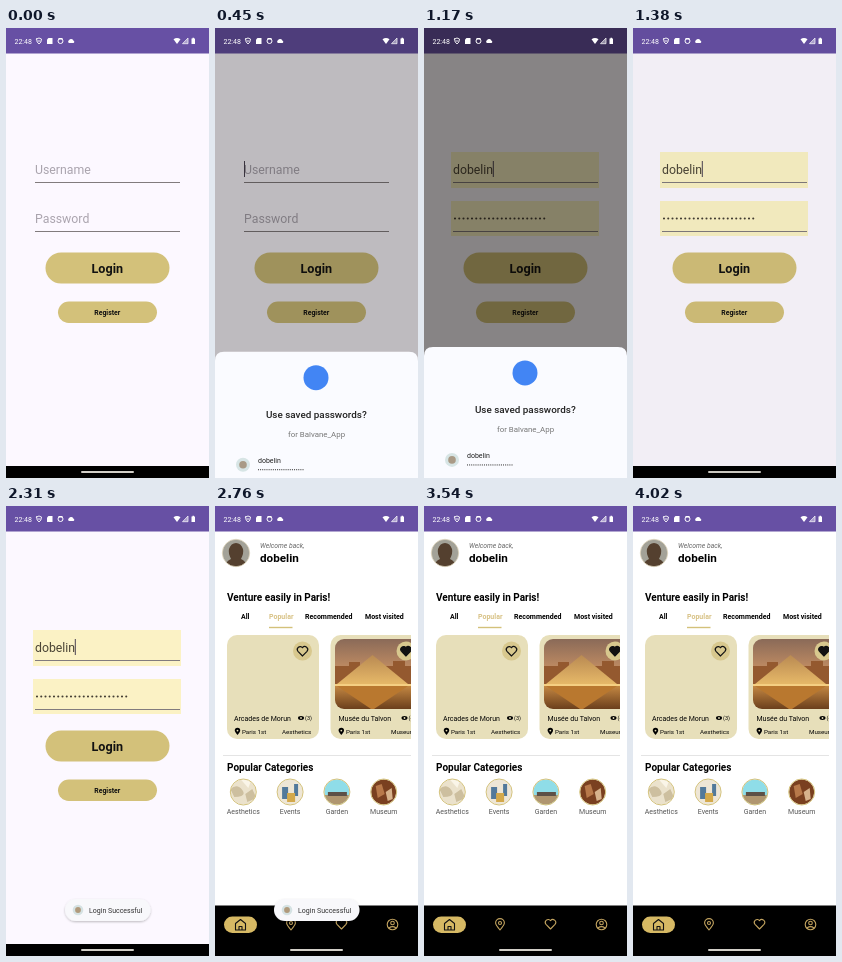
Write an HTML page that moves like this. It is 203 px wide and 450 px high and loops after 4050 ms.

```html
<!DOCTYPE html>
<html lang="en">
<head>
<meta charset="utf-8">
<title>Login flow</title>
<style>
html, body { margin: 0; width: 100%; height: 100%; overflow: hidden; background: #fcf8ff; }
svg { display: block; width: 100%; height: 100%; font: 7px Roboto, Arial, sans-serif; }
.b { font-weight: 700; }
.m { font-weight: 500; }
.c { text-anchor: middle; }
.field { font-size: 12.3px; }
.line { fill: none; stroke-linecap: round; stroke-linejoin: round; }
</style>
</head>
<body>
<svg viewBox="0 0 203 450">
<defs>
  <path id="heart" d="M0 5L-4.5.3A2.9 2.9 0 0 1 0-3.4A2.9 2.9 0 0 1 4.5.3Z"/>
  <path id="pin" d="M0 5.5C-3 2-4.4.3-4.4-1.5A4.4 4.4 0 0 1 4.4-1.5C4.4.3 3 2 0 5.5Z"/>
  <g id="eye"><ellipse rx="3" ry="1.9"/><circle r=".9" fill="#e7dfba"/></g>
  <g id="place"><use href="#pin" transform="scale(.62)"/><circle cy="-.9" r=".9" fill="#e7dfba"/></g>
  <linearGradient id="dusk" x2="0" y2="1">
    <stop offset="0" stop-color="#8a6a58"/><stop offset=".4" stop-color="#bd8a62"/>
    <stop offset=".65" stop-color="#c98c45"/><stop offset="1" stop-color="#6b3f1c"/>
  </linearGradient>
  <linearGradient id="glow" x2="0" y2="1">
    <stop offset="0" stop-color="#b98a52"/><stop offset="1" stop-color="#e6b868"/>
  </linearGradient>
  <clipPath id="scroller"><path d="M0 120H196V245H0Z"/></clipPath>
  <clipPath id="photo"><rect x="120" y="133" width="84" height="70" rx="9"/></clipPath>
  <clipPath id="disc"><circle r="12.5"/></clipPath>
  <clipPath id="face"><circle cx="21" cy="47" r="13.5"/></clipPath>
  <filter id="shadow" x="-20%" y="-40%" width="140%" height="190%">
    <feDropShadow dx="0" dy="1" stdDeviation="1.3" flood-opacity=".25"/>
  </filter>
</defs>

<g id="login">
  <path fill="#fcf8ff" d="M0 0H203V450H0Z"/>
  <g id="empty" class="field" fill="#aaa4ae">
    <text x="29" y="146">Username</text><text x="29" y="195">Password</text>
  </g>
  <g id="filled" class="field">
    <path fill="#fbf2c5" d="M27 124H175V160H27ZM27 173H175V208H27Z"/>
    <text x="29" y="146" fill="#4b4536">dobelin</text>
    <path class="line" d="M31 190.5H121" stroke="#443e33" stroke-width="2.1" stroke-dasharray="0 4.25"/>
  </g>
  <path d="M29 154.5H174M29 203.5H174" stroke="#817b7d" stroke-width="1"/>
  <path id="caret" stroke="#4a4252" stroke-width="1"/>
  <rect x="39.5" y="224.5" width="124" height="31" rx="15.5" fill="#d3c17a"/>
  <rect x="52" y="273.5" width="99" height="21.5" rx="10.75" fill="#d3c17a"/>
  <text class="b c" x="101.3" y="245" font-size="12.6" fill="#111">Login</text>
  <text class="b c" x="101.3" y="287" font-size="6.9" fill="#111">Register</text>
</g>

<g id="dash">
  <path fill="#fff" d="M0 0H203V450H0Z"/>
  <g clip-path="url(#face)">
    <circle cx="21" cy="47" r="14" fill="#a3a298"/>
    <path fill="#54402f" d="M10 61Q11 55 16 53Q13 47 14 43Q16 37 21 37T28 43Q29 47 26 53Q31 55 32 61Z"/>
  </g>
  <circle cx="21" cy="47" r="13.7" fill="none" stroke="#d8cfb5" stroke-width=".8"/>
  <text x="45" y="42" font-size="6.8" font-style="italic" fill="#666">Welcome back,</text>
  <text class="b" x="45" y="56" font-size="11.7">dobelin</text>
  <g class="b" font-size="10"><text x="12" y="95">Venture easily in Paris!</text><text x="12" y="265">Popular Categories</text></g>
  <g class="b">
    <text x="26" y="113">All</text><text x="54" y="113" fill="#d8c286">Popular</text>
    <text x="90" y="113">Recommended</text><text x="150" y="113">Most visited</text>
  </g>
  <path d="M54 121.5H77.5" stroke="#d3c17a" stroke-width="1.4"/>
  <g clip-path="url(#scroller)">
    <g fill="#e7dfba"><rect x="12" y="129" width="92" height="104" rx="10"/><rect x="115.5" y="129" width="92" height="104" rx="10"/></g>
    <g clip-path="url(#photo)">
      <path fill="url(#dusk)" d="M120 133H204V203H120Z"/>
      <path fill="#94592f" d="M120 160H134V156H145V160H178V155H190V160H204V178H120Z"/>
      <path fill="url(#glow)" d="M122 178L157.5 149L193 178Z"/>
      <path fill="#b9782f" d="M122 180H193L157.5 204Z"/>
      <path fill="#f5cf82" d="M120 178H204V180H120Z"/>
    </g>
    <g fill="#d8c88e"><circle cx="87.5" cy="145" r="9.5"/><circle cx="191" cy="145" r="9.5"/></g>
    <use href="#heart" x="87.5" y="145" fill="none" stroke="#111" stroke-width="1.2"/>
    <use href="#heart" x="191" y="145" fill="#111" stroke="#111" stroke-width="1.2"/>
    <text x="19" y="215">Arcades de Morun</text><text x="123.5" y="215">Musée du Talvon</text>
    <use href="#eye" x="86" y="212"/><use href="#eye" x="189.5" y="212"/>
    <use href="#place" x="22.5" y="225.5"/><use href="#place" x="126.3" y="225.5"/>
    <g font-size="6.2">
      <text x="90" y="214" font-size="5.5">(3)</text><text x="193.5" y="214" font-size="5.5">(4)</text>
      <text x="27" y="228">Paris 1st</text><text x="67" y="228">Aesthetics</text>
      <text x="131" y="228">Paris 1st</text><text x="176" y="228">Museum</text>
    </g>
  </g>
  <path d="M8 249.5H196" stroke="#dedede" stroke-width=".8"/>
  <g id="categories"></g>
  <path d="M0 399.4H203V450H0Z"/>
  <rect x="9" y="410.5" width="33" height="16.5" rx="8.25" fill="#d6b964"/>
  <g class="line" stroke="#c2a35f" stroke-width="1.1">
    <path stroke="#111" d="M20.5 417.5L25.5 413.5L30.5 417.5V424H20.5ZM24 424V420.5H27V424"/>
    <use href="#pin" x="76" y="418.5"/><circle cx="76" cy="417" r="1.5"/>
    <use href="#heart" x="126.5" y="418"/>
    <circle cx="177.5" cy="418.5" r="5.3"/><circle cx="177.5" cy="417" r="1.8"/><path d="M174 422Q177.5 419.3 181 422"/>
  </g>
</g>

<path fill="#6750a4" d="M0 0H203V25.4H0Z"/>
<path d="M0 438H203V450H0Z"/>
<path class="line" d="M76 444H127" stroke="#d2cfc8" stroke-width="2"/>
<path id="dim" fill="#070500" d="M0 0H203V450H0Z"/>

<g fill="#fff">
  <text x="8.5" y="15.6">22:48</text>
  <path class="line" stroke="#fff" stroke-width=".9" d="M30.5 11L33 10L35.5 11Q35.5 14.5 33 16Q30.5 14.5 30.5 11ZM32 13H34"/>
  <path d="M42.5 10H46.5V16H41V11.5Z"/>
  <circle cx="54.5" cy="13" r="2.5" fill="none" stroke="#fff"/><path d="M52.5 10H56.5V11.5H52.5Z"/>
  <path d="M63 15A1.5 1.5 0 0 1 63 12.3A2.4 2.4 0 0 1 67.3 12.4A1.4 1.4 0 0 1 67.5 15Z"/>
  <path d="M167.5 11.3Q171 8.7 174.5 11.3L171 16Z"/>
  <path d="M176.5 15.7L182 10V15.7Z" fill-opacity=".45" stroke="#fff" stroke-width=".7"/>
  <path d="M185.5 10.5H186.5V9.8H188V10.5H189V16H185.5Z"/>
</g>

<g id="sheet">
  <path fill="#fafbff" d="M0 460V292Q0 283 9 283H194Q203 283 203 292V460Z"/>
  <circle cx="101" cy="309" r="12.5" fill="#4285f4"/>
  <text class="m c" x="101.3" y="349" font-size="9.9" fill="#222">Use saved passwords?</text>
  <text class="c" x="101.5" y="368" font-size="7.9" fill="#777">for Balvane_App</text>
  <circle cx="28" cy="396" r="7" fill="#d7e5e5"/><circle cx="28" cy="396" r="3.8" fill="#a99a86"/>
  <text x="43" y="394.5" fill="#222">dobelin</text>
  <path class="line" d="M43.5 401H88.5" stroke="#444" stroke-width="1.2" stroke-dasharray="0 2.12"/>
  <text x="18" y="439" fill="#333">No thanks</text>
  <rect x="148" y="427.5" width="43" height="18" rx="9" fill="#c3e6fb"/>
  <text class="c" x="169.5" y="439" fill="#173746">Continue</text>
</g>

<g id="toast">
  <rect x="59" y="393" width="85.5" height="22" rx="11" fill="#f8f8fb" filter="url(#shadow)"/>
  <circle cx="72" cy="404" r="5.3" fill="#d5e2e3"/><circle cx="72" cy="404" r="2.9" fill="#b09a7c"/>
  <text x="83" y="406.5" fill="#333">Login Successful</text>
</g>
</svg>

<script>
const LOOP = 4050;
const $ = id => document.getElementById(id);
const ramp = (t, from, to) => Math.min(1, Math.max(0, (t - from) / (to - from)));
const fade = (id, value) => $(id).setAttribute('opacity', value);
const move = (id, x, y) => $(id).setAttribute('transform', `translate(${x} ${y})`);

// Each thumbnail: label, base tone, then flat shapes around its centre
const categories = [
  ['Aesthetics', '#ebe2cc', ['#cdbf9f', 'M-13-3Q-6-9-1-2T-9 5ZM2 2L9-3L13 6L4 10Z'], ['#faf5e8', 'M-2-12H8L5-4Z']],
  ['Events', '#eee6d6', ['#52799b', 'M-8-5H-2V7H-8ZM4-8H8V4H4Z'], ['#d4a94b', 'M-3 1H5V10H-3Z']],
  ['Garden', '#8fdde8', ['#b0966f', 'M-13 3H13V13H-13Z'], ['#5d5147', 'M-9 0H10V4H-9Z']],
  ['Museum', '#7a4020', ['#b8794a', 'M-8-6L-2-8L1 2L-6 6Z'], ['#d7b38c', 'M2 0L8-4L9 7L4 9Z']]
];
$('categories').innerHTML = categories.map(([label, tone, ...shapes], i) => {
  const x = 28.3 + i * 46.8;
  const art = shapes.map(([fill, d]) => `<path fill="${fill}" d="${d}"/>`).join('');
  return `<g transform="translate(${x} 286)"><g clip-path="url(#disc)"><circle r="13" fill="${tone}"/>${art}</g>
    <circle r="13" fill="none" stroke="#d3c17a"/><text class="c" y="21.5" fill="#555">${label}</text></g>`;
}).join('');

function draw(t) {
  const filled = t >= 1080;
  fade('empty', filled ? 0 : 1);
  fade('filled', filled ? 1 : 0);
  fade('caret', t >= 300 ? 1 : 0);
  $('caret').setAttribute('d', `M${filled ? 69.3 : 29.5} 133V149`);

  const rise = 1 - (1 - ramp(t, 360, 600)) ** 3;
  const drop = ramp(t, 1080, 1278) ** 2;
  move('sheet', 0, 170 * (1 - rise + drop));
  fade('dim', 0.5 * (ramp(t, 360, 540) - ramp(t, 1160, 1400)));

  const enter = ramp(t, 2430, 2580);
  move('dash', 20 * (1 - enter) ** 2, 0);
  fade('dash', enter);
  fade('toast', ramp(t, 2100, 2200) - ramp(t, 3090, 3210));
}

const start = performance.now();
function tick() {
  draw((performance.now() - start) % LOOP);
  requestAnimationFrame(tick);
}
tick();
</script>
</body>
</html>
```
